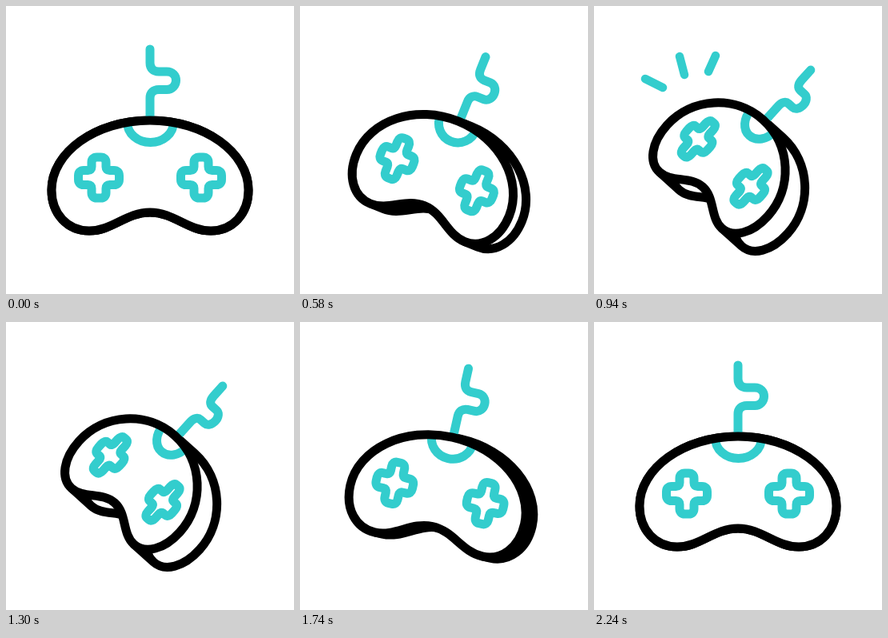
An HTML page for the animation above (2.4 s loop, 360x360 px).

```html
<!DOCTYPE html>
<html lang="en">
<head>
<meta charset="utf-8">
<title>Game controller</title>
<style>
html, body { margin: 0; width: 100%; height: 100%; overflow: hidden; background: #fff; }
svg { display: block; width: 100%; height: 100%; }
path { fill: none; stroke-width: 11; stroke-linecap: round; stroke-linejoin: round; }
.ink { stroke: #000; }
.teal { stroke: #33cdcd; }
.paper { fill: #fff; }
#bowl { stroke-linecap: butt; }
#sparks { stroke-width: 10.5; }
</style>
</head>
<body>
<svg viewBox="0 0 360 360">
  <path id="back" class="ink"/>
  <path id="cord" class="teal"/>
  <path id="face" class="paper"/>
  <path id="bowl" class="teal"/>
  <path id="padL" class="teal"/>
  <path id="padR" class="teal"/>
  <path id="rim" class="ink"/>
  <path id="sparks" class="teal"/>
</svg>
<script>
const LOOP = 2400, HALF = 1120, TURN = 42 * Math.PI / 180;

// Shapes are relative to the controller's centre.
const BODY = 'M0,-71 C68,-71 123,-31 123,16 C123,46 103,67 76,67 C47,67 30,44 0,44 ' +
  'C-30,44 -47,67 -76,67 C-103,67 -123,46 -123,16 C-123,-31 -68,-71 0,-71 Z';
const CORD = 'M0,-160 L0,-143 C0,-136 4,-132 11,-132 L21,-132 C28,-132 32.5,-127 32.5,-121 ' +
  'C32.5,-115 28,-109.5 21,-109.5 L11,-109.5 C4,-109.5 0,-105 0,-99 L0,-74';
const BOWL = 'M-28.5,-69 C-28.5,-54.5 -15.7,-43.5 0.5,-43.5 C16.7,-43.5 29.5,-54.5 29.5,-69';
const PAD = 'M-9,-19 C-9,-23 -6.5,-25.5 -2.5,-25.5 L2.5,-25.5 C6.5,-25.5 9,-23 9,-19 ' +
  'L9,-13.5 C9,-10.5 10.5,-9 13.5,-9 L19,-9 C23,-9 25.5,-6.5 25.5,-2.5 ' +
  'L25.5,2.5 C25.5,6.5 23,9 19,9 L13.5,9 C10.5,9 9,10.5 9,13.5 ' +
  'L9,19 C9,23 6.5,25.5 2.5,25.5 L-2.5,25.5 C-6.5,25.5 -9,23 -9,19 ' +
  'L-9,13.5 C-9,10.5 -10.5,9 -13.5,9 L-19,9 C-23,9 -25.5,6.5 -25.5,2.5 ' +
  'L-25.5,-2.5 C-25.5,-6.5 -23,-9 -19,-9 L-13.5,-9 C-10.5,-9 -9,-10.5 -9,-13.5 Z';
// Inner end, outer end
const SPARKS = [[86, 102, 64, 91], [113, 86, 107, 63], [143, 82, 152, 62]];

// Time, amount of turn, slope
const KEYS = [[0, 0, 0], [320, .08, .0007], [580, .52, .0034],
  [660, .82, .0018], [940, 1, .0001], [HALF, 1.01, 0]];

const el = id => document.getElementById(id);
const draw = (id, d) => el(id).setAttribute('d', d);
const smooth = (t, a, b) => {
  const u = Math.min(1, Math.max(0, (t - a) / (b - a)));
  return u * u * (3 - 2 * u);
};

function turnAt(t) {
  const i = Math.max(1, KEYS.findIndex(k => t <= k[0]));
  const [t0, p0, m0] = KEYS[i - 1], [t1, p1, m1] = KEYS[i];
  const h = t1 - t0, u = (t - t0) / h, v = 1 - u;
  return v * v * (1 + 2 * u) * p0 + u * u * (3 - 2 * u) * p1 + h * u * v * (v * m0 - u * m1);
}

function render(time) {
  const t = time % LOOP;
  const p = turnAt(t <= HALF ? t : Math.max(0, 2 * HALF - t));
  const cx = 180 - 16.5 * p, cy = 214 - 18.5 * p + 24 * p * (1 - p);
  const c = Math.cos(TURN * p), s = Math.sin(TURN * p);
  const squeeze = 1 - .31 * p, depth = 33 * p, lift = -2 * p;

  // Scale and shift in the controller's own frame, then turn it.
  const place = (shape, sx, sy, dx, dy) =>
    shape.replace(/(-?[\d.]+),(-?[\d.]+)/g, (_, a, b) => {
      const x = a * sx + dx, y = b * sy + dy;
      return (cx + x * c - y * s).toFixed(2) + ',' + (cy + x * s + y * c).toFixed(2);
    });

  const body = (shape, dx) => place(shape, squeeze, 1 - .02 * p, dx, lift);
  const pad = x => place(PAD, squeeze, 1 + .09 * p, x * squeeze, .5);
  const face = body(BODY, 0);
  const edges = ['0,-71', '-76,67', '76,67']
    .map(spot => `M${body(spot, 0)}L${body(spot, depth)}`).join('');

  draw('back', body(BODY, depth) + edges);
  draw('cord', place(CORD, squeeze, 1 - .015 * p, 2.5 * p, 0));
  draw('face', face);
  draw('rim', face);
  draw('bowl', place(BOWL, squeeze, 1, 0, lift));
  draw('padL', pad(-64));
  draw('padR', pad(64));

  const head = smooth(t, 760, 920), tail = smooth(t, 960, 1085);
  draw('sparks', head > 0 && tail < 1 ? SPARKS.map(([x, y, X, Y]) => {
    const at = u => `${x + (X - x) * u},${y + (Y - y) * u}`;
    return `M${at(tail)}L${at(head)}`;
  }).join('') : '');
}

const start = performance.now();
function tick() {
  render(performance.now() - start);
  requestAnimationFrame(tick);
}
tick();
</script>
</body>
</html>
```
